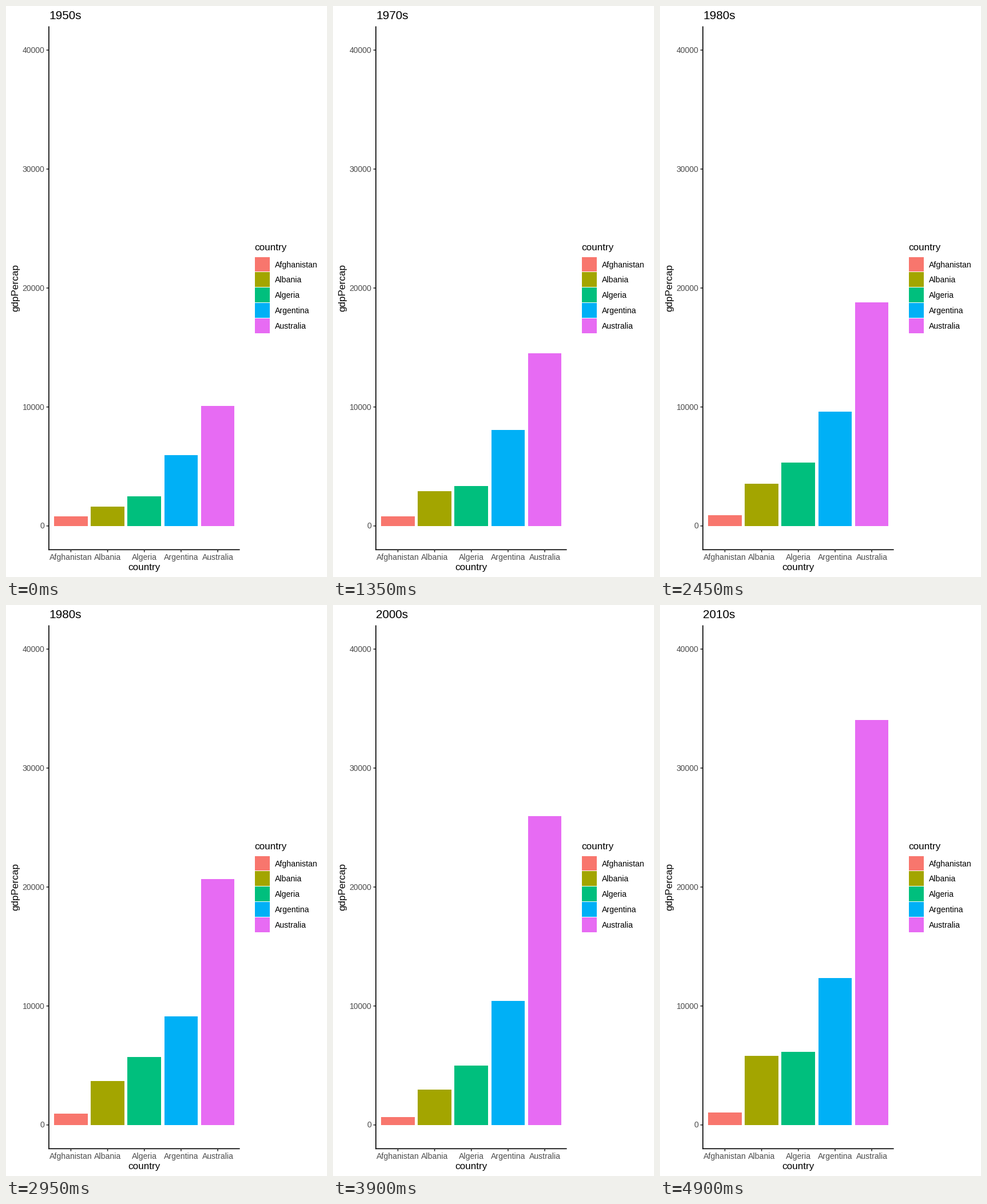
Recreate the animation shown at these times as a matplotlib script. Size 561 by 998 pixels, loop 4950 ms.

```python
import math

import matplotlib.pyplot as plt
import numpy as np
from matplotlib.animation import FuncAnimation
from matplotlib.patches import Rectangle

W, H, DPI = 561, 998, 64
FRAMES, INTERVAL = 99, 50
START, SPAN = 1952, 55         # years

LEFT, RIGHT, TOP, BOTTOM = 74.9, 408.6, 35.5, 950.3
UNIT = (RIGHT - LEFT) / 5.2    # width of one category
SCALE = (BOTTOM - TOP) / 1.1 / 40000
ZERO = BOTTOM - 2000 * SCALE
TICK, LINE = 4.3, 1.66
SMALL, MEDIUM, LARGE = 14, 17.1, 20.8


def wave(year):
    """A level economy with swings that widen over time."""
    swing = 40 + 3 * (year - START)
    return 800 + swing * math.cos(math.tau * (year - 1983) / 23)


def path(**turns):
    """Straight growth between turning points such as y1952=1600."""
    years = [int(key[1:]) for key in turns]
    return lambda year: np.interp(year, years, list(turns.values()))


COUNTRIES = {
    "Afghanistan": ("#F8766D", wave),
    "Albania": ("#A3A500", path(
        y1952=1600, y1972=3310, y1987=3740, y1992=2500, y1997=3190,
        y2007=5940)),
    "Algeria": ("#00BF7D", path(
        y1952=2450, y1957=3010, y1962=2550, y1982=5745, y1987=5680,
        y1997=4800, y2007=6220)),
    "Argentina": ("#00B0F6", path(
        y1952=5910, y1967=8050, y1977=10080, y1982=9000, y1992=9310,
        y1997=10970, y2002=8800, y2007=12780)),
    "Australia": ("#E76BF3", path(
        y1952=10040, y1962=12220, y1972=16790, y1982=19560, y1992=23500,
        y2007=34435)),
}

plt.rcParams["font.family"] = "Liberation Sans"
fig = plt.figure(figsize=(W / DPI, H / DPI), dpi=DPI, facecolor="white")
ax = fig.add_axes([0, 0, 1, 1])
ax.set_xlim(0, W)
ax.set_ylim(H, 0)
ax.axis("off")


def pt(px):
    return px * 72 / DPI


def label(x, y, text, size, color="black", ha="left", **kw):
    return ax.text(x, y, text, fontsize=pt(size), color=color, ha=ha,
                   va="baseline", **kw)


def line(xs, ys, color="black"):
    ax.plot(xs, ys, color=color, lw=pt(LINE), solid_capstyle="butt",
            snap=False)


def box(x, y, w, h, color):
    return ax.add_patch(Rectangle((x, y), w, h, facecolor=color, lw=0,
                                  edgecolor="none", snap=False,
                                  antialiased=False))


# Axes and titles
for value in range(0, 40001, 10000):
    y = ZERO - value * SCALE
    line([LEFT - TICK, LEFT], [y, y], "#333333")
    label(67.2, y + 4.7, str(value), SMALL, "#4D4D4D", "right")

line([LEFT, LEFT], [TOP, BOTTOM + LINE / 2])
line([LEFT - LINE / 2, RIGHT], [BOTTOM, BOTTOM])

label((LEFT + RIGHT) / 2, 986, "country", MEDIUM, ha="center")
label(21, (TOP + BOTTOM) / 2, "gdpPercap", MEDIUM, ha="center", rotation=90,
      rotation_mode="anchor")
title = label(75, 23, "", LARGE)
label(434.6, 427, "country", MEDIUM)

# One bar, tick and legend key per country
bars = []
for i, (name, (color, level)) in enumerate(COUNTRIES.items()):
    x = LEFT + UNIT * (0.6 + i)
    line([x, x], [BOTTOM, BOTTOM + TICK], "#333333")
    label(x, 968, name, SMALL, "#4D4D4D", "center")
    bar = box(x - 0.45 * UNIT, ZERO, 0.9 * UNIT, 0, color)
    bars.append((bar, level))

    y = 451.5 + 26.88 * i
    box(435.7, y - 12.4, 24.8, 24.8, color)
    label(470, y + 5, name, SMALL)


def update(frame):
    year = START + SPAN * frame / FRAMES
    for bar, level in bars:
        height = level(year) * SCALE
        bar.set_y(ZERO - height)
        bar.set_height(height)
    title.set_text(f"{round(year / 10) * 10}s")


anim = FuncAnimation(fig, update, frames=FRAMES, interval=INTERVAL,
                     repeat=True, repeat_delay=0, blit=False)
plt.show()
```
